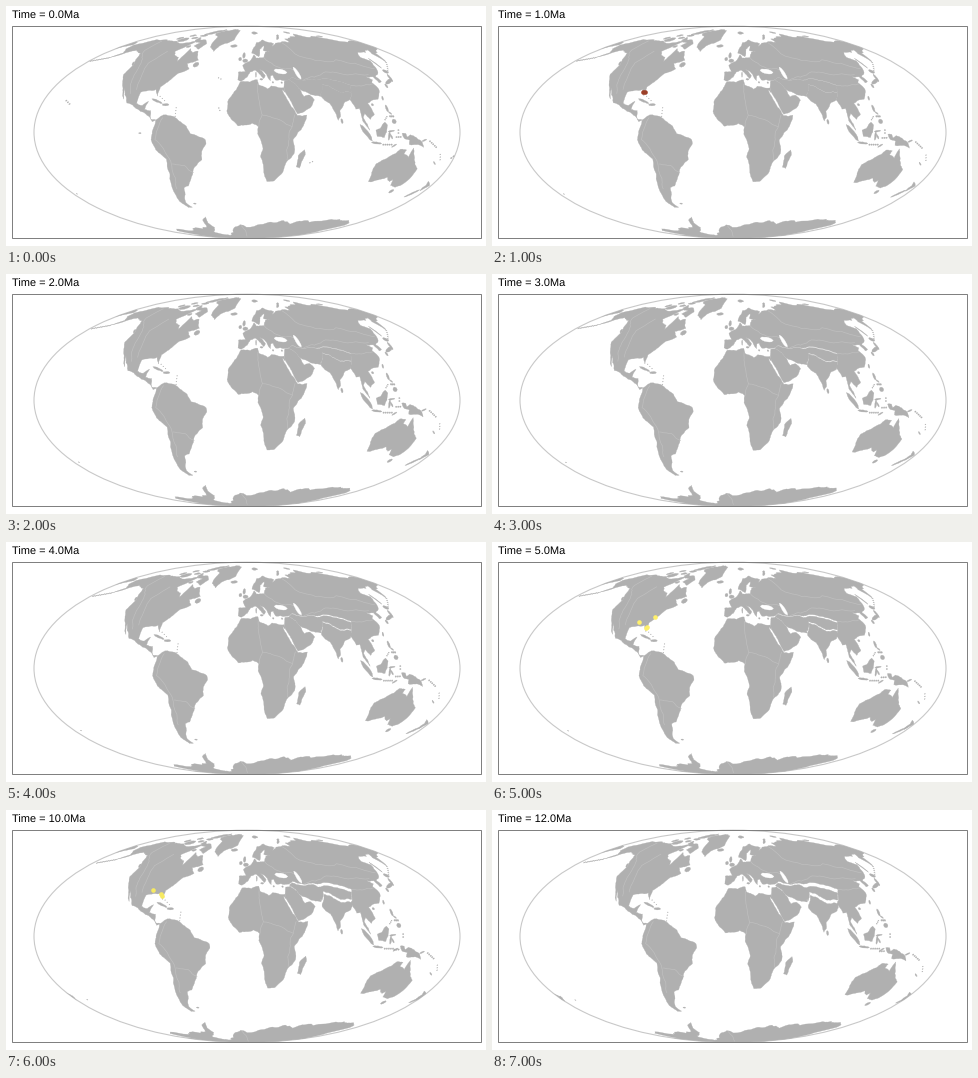
These frames come from a looping animation (480x240 px, 8000 ms). A matplotlib script:

```python
import numpy as np
import matplotlib.pyplot as plt
from matplotlib.animation import ArtistAnimation
from matplotlib.patches import Ellipse, Polygon, Rectangle

W, H, DPI = 480, 240, 100
PX = 72 / DPI
CX, CY, RX, RY = 241, 126.3, 213, 106.1
LAND, SEAM, RIM, BOX = "#b0b0b0", "#bfbfbf", "#c8c8c8", "#808080"
AGES = [0, 1, 2, 3, 4, 5, 10, 12]

# Rotation back in time: pole latitude, pole longitude, degrees per Myr
NAM = (62, 110, 0.40)
SAM = (90, 0, 0.33)
AFR = (28, 110, 0.22)
ARB = (15, 128, 0.21)
IRAN = (0, 128, 0.11)
IND = (-8, 168, 0.46)
TIBET = (-8, 168, 0.24)
EUR = (90, 0, 0.08)
SEA = (90, 0, 0.12)
PHL = (90, 0, 0.40)
AUS = (9, 40, -0.60)
PAC = (-80, 105, -0.85)
ANT = (0, 75, 0.17)

shapes = []


def roughen(points, rounds=3):
    """Break each edge at a shifted midpoint; an edge shared by two shapes breaks alike."""
    p = np.array(points, float)
    for _ in range(rounds):
        mid = (p[:-1] + p[1:]) / 2
        size = 0.07 * np.hypot(*(p[1:] - p[:-1]).T)
        mid[:, 0] += size * np.sin(7 * mid[:, 0] + 11 * mid[:, 1])
        mid[:, 1] += size * np.sin(13 * mid[:, 0] - 5 * mid[:, 1])
        out = np.empty((2 * len(p) - 1, 2))
        out[::2], out[1::2] = p, mid
        p = out
    return p


def land(plate, points, oldest=99):
    shapes.append((plate, roughen(points + points[:1]), "land", oldest))


def seam(plate, *points):
    shapes.append((plate, roughen(points), "seam", 99))


def blob(plate, lon, lat, length, width, tilt=0, kind="land", oldest=99):
    a, t = np.linspace(0, 2 * np.pi, 9), np.radians(tilt)
    u, v = length / 2 * np.cos(a), width / 2 * np.sin(a)
    points = np.column_stack([lon + u * np.cos(t) - v * np.sin(t),
                              lat + u * np.sin(t) + v * np.cos(t)])
    shapes.append((plate, roughen(points, 1), kind, oldest))


def chain(plate, start, end, count, size=1, oldest=99):
    for lon, lat in np.linspace(start, end, count):
        blob(plate, lon, lat, size, 0.8 * size, oldest=oldest)


def rotate(points, plate, age):
    """Turn points about the plate's pole; longitudes come back unbroken."""
    plat, plon, rate = np.radians(plate)
    lon, lat = np.radians(points).T
    r = np.array([np.cos(lat) * np.cos(lon), np.cos(lat) * np.sin(lon), np.sin(lat)]).T
    k = np.array([np.cos(plat) * np.cos(plon), np.cos(plat) * np.sin(plon), np.sin(plat)])
    a = rate * age
    r = (r * np.cos(a) + np.cross(k, r) * np.sin(a)
         + np.outer(r @ k, k) * (1 - np.cos(a)))
    lon = np.degrees(np.unwrap(np.arctan2(r[:, 1], r[:, 0])))
    lon -= 360 * np.round(lon.mean() / 360)
    return lon, np.degrees(np.arcsin(np.clip(r[:, 2], -1, 1)))


def mollweide(lon, lat):
    phi = np.radians(np.clip(lat, -89.9, 89.9))
    t = phi.copy()
    for _ in range(30):
        t -= (2 * t + np.sin(2 * t) - np.pi * np.sin(phi)) / (2 + 2 * np.cos(2 * t))
    return np.column_stack([CX + RX * lon / 180 * np.cos(t), CY - RY * np.sin(t)])


# North America
arctic = [(-168, 65.6), (-156.5, 71.3), (-128, 70), (-96, 68), (-82, 69.5), (-94, 60),
          (-82, 55), (-79.5, 51.3), (-77.5, 62.5), (-69.5, 59), (-64.5, 60.3), (-56, 52.5),
          (-66.5, 50), (-61, 45.5)]
gulf = [(-70, 42), (-76, 35.5), (-81, 31.8), (-80.5, 25.2), (-84, 30), (-97, 28),
        (-97, 20), (-91.5, 18.5), (-87, 21.5), (-88.7, 15.8), (-83.2, 15), (-82, 9),
        (-77.4, 8.5)]
pacific = [(-80.5, 7.3), (-87.5, 13), (-95, 16.1), (-105.6, 20.3), (-113.5, 31),
           (-109.6, 23), (-117.2, 32.8), (-124.3, 41), (-124, 48.5), (-135, 58.5),
           (-147, 61), (-163.5, 54.8), (-157.5, 58.7), (-165, 62)]
land(NAM, arctic + gulf + pacific)
land(NAM, [(-72, 78.2), (-60, 82), (-33, 83.5), (-20, 82), (-22, 71), (-40, 65),
           (-43.5, 60), (-52, 64), (-56, 74)])
land(NAM, [(-88, 73.5), (-71, 71), (-62, 67), (-66, 62), (-77, 65), (-73, 68), (-88, 70.5)])
blob(NAM, -110, 71, 15, 4)
blob(NAM, -122, 72.8, 8, 2.5)
blob(NAM, -78, 79.8, 30, 5, 10)
blob(NAM, -88, 75.6, 14, 1.8)
blob(NAM, -110, 75.6, 10, 2)
blob(NAM, -96, 73, 10, 2)
blob(NAM, -84, 64.5, 6, 2)
blob(NAM, -56, 48.8, 6, 4)
blob(NAM, -126, 49.6, 5, 1.5, -35)
blob(NAM, -79.5, 21.6, 11, 1.4, -17)
blob(NAM, -71.3, 19.1, 6, 1.6)
chain(NAM, (-61.5, 17), (-61.4, 11), 4, 0.7)
chain(NAM, (-78, 25), (-73, 22), 3, 0.7)
chain(NAM, (-164, 54.4), (-178, 51.8), 8, 1.4)
seam(NAM, (-141, 69.7), (-136, 61), (-118, 50), (-113, 40), (-106, 27))
seam(NAM, (-104, 60), (-110, 50), (-104, 37), (-102, 30))

# South America
land(SAM, [(-77.4, 8.5), (-71.7, 12), (-62, 10.6), (-51.5, 4.3), (-48, -1), (-35.3, -5.2),
           (-34.9, -8), (-39, -13.5), (-39.5, -19), (-48.5, -26), (-54.5, -34.8),
           (-57.5, -38), (-62, -39), (-66, -46), (-69, -51), (-65.2, -54.8), (-70, -55),
           (-75, -50), (-73.5, -37.2), (-70.4, -18.4), (-76.2, -14), (-81.3, -5),
           (-80, 0.8)])
blob(SAM, -59.5, -51.8, 3, 1)
seam(SAM, (-72, 10), (-78, -5), (-67, -20), (-67, -32), (-70, -40))
seam(SAM, (-66, -22), (-56, -23), (-49, -28))

# Africa and Arabia
land(AFR, [(-6, 35.8), (10, 37.2), (11, 33.5), (19, 30.3), (23, 32.6), (34.3, 31.3),
           (34.5, 28), (32.6, 29.9), (37.3, 20), (43.2, 11.5), (51.2, 11.9), (47.8, 4.5),
           (39, -5), (40.7, -14.5), (35.2, -20), (32.5, -28), (26, -34), (19, -34.6),
           (14.5, -22.5), (11.8, -17), (13.7, -11), (9, -1), (9.5, 4), (4.3, 6.3),
           (-7.5, 4.4), (-13.3, 9), (-17.4, 14.7), (-17, 21.3), (-9.7, 30)])
land(AFR, [(49.3, -12), (50.4, -15.5), (47, -25), (44, -24), (44.4, -16.2)])
seam(AFR, (10, 34), (10, 27), (13, 12), (10, 4))
seam(AFR, (13, 12), (22, 10), (38, 4))
seam(AFR, (41, 12), (36, 1), (34, -12), (35, -19))
land(ARB, [(34.5, 31.3), (36.3, 36.7), (41, 37.3), (46, 34), (49, 30), (51, 25),
           (56.3, 26), (59.8, 22.5), (55, 17), (43.5, 12.7), (39.2, 21), (34.8, 28.5)])

# Eurasia, with the blocks squeezed along its southern edge
himalaya = [(67, 27), (71, 34), (77, 32.5), (85, 28), (95, 28)]
kunlun = [(98, 33), (88, 36), (76, 38), (66, 37)]
zagros = [(41, 37.3), (46, 34), (49, 30), (56.5, 27), (66.5, 25)]
mediterranean = [(53, 37), (44, 39), (41, 37.3), (36.3, 36.7), (27.5, 37), (26, 40.7),
                 (23.5, 40), (22.7, 36.5), (19.5, 41.5), (13, 45.5), (18.3, 40),
                 (16, 38), (12.3, 41.7), (8.8, 44.4), (3.2, 43), (0, 39), (-5.6, 36.1)]
atlantic = [(-8.9, 37), (-8.9, 43), (-1.6, 43.5), (-4.6, 48.3), (4.5, 52.5), (8.5, 57),
            (11, 54.2), (20, 54.5), (23.6, 59.3), (29.5, 59.9), (21.5, 61), (25, 65.2),
            (17.3, 61.8), (14.2, 55.4), (6, 58.5), (15, 68.3), (27, 71), (41, 67),
            (36, 64.5), (54, 68.5)]
siberia = [(68, 68.5), (67, 72), (80, 73), (104, 77.6), (113, 74), (140, 72.6),
           (170, 70), (190, 66.2), (178, 62.5), (163, 58.5), (156.7, 51), (157, 58),
           (162, 61.6), (142.5, 59.3), (135.3, 54.8), (141, 52), (135.3, 44)]
orient = [(127.5, 39.5), (129.4, 36), (126.3, 34.8), (125, 39.5), (118, 39.5), (122, 37),
          (119.3, 35), (121.8, 30), (116.5, 23), (106, 20), (109.2, 12.5), (105, 8.9),
          (101, 13), (99.3, 10), (103.8, 1.4), (98.3, 8), (97.5, 16.5), (94.3, 16),
          (91.5, 22.7), (95, 28)]
land(EUR, mediterranean + atlantic + siberia + orient + kunlun)
land(TIBET, himalaya + kunlun)
land(IRAN, zagros + himalaya[:2] + [(66, 37), (53, 37), (44, 39)])
land(IND, himalaya + [(91.5, 22.7), (87, 21.3), (80.2, 15), (80, 11), (77.7, 8.2),
                      (72.8, 20), (69, 22), (66.5, 25)])
blob(IND, 80.7, 7.7, 3.4, 1.8, 100)
blob(EUR, 34.5, 43.5, 13, 3.6, -8, "sea")
blob(EUR, 51, 42.2, 10, 3.6, 110, "sea")
blob(EUR, -2, 52, 6, 3)
blob(EUR, -3.7, 56.5, 5, 3.2, 80)
blob(EUR, -8, 53.4, 3.5, 3)
blob(EUR, -19, 65, 10, 2.4)
blob(EUR, 18, 78.7, 14, 3)
blob(EUR, 59, 74, 16, 1.6, 20)
blob(EUR, 98, 79.3, 11, 2)
blob(EUR, 143, 74.8, 11, 1.2)
blob(EUR, 14, 37.5, 3, 1.3)
blob(EUR, 9, 41, 4, 1, 85)
chain(EUR, (24.8, 35.2), (33.2, 35), 2, 1.5)
blob(EUR, 131, 32.6, 3, 2, 80)
blob(EUR, 136.5, 35.8, 10, 2, 20)
blob(EUR, 140.8, 38.5, 6, 2, 75)
blob(EUR, 142.8, 43.4, 4.5, 3)
blob(EUR, 142.8, 50, 8, 1.2, 88)
chain(EUR, (146, 44), (156, 50.5), 5, 0.9)
blob(EUR, 121, 23.7, 3.2, 1.3, 70)
blob(EUR, 109.7, 19.1, 2, 1.6)
seam(EUR, (55, 68), (60, 58), (85, 52), (120, 50), (135, 46))
seam(EUR, (55, 37), (70, 40), (88, 43), (122, 41))
seam(EUR, (98, 33), (110, 33), (119, 34))
seam(EUR, (20, 55), (30, 48), (48, 45))

# South-east Asia
land(SEA, [(109, 1.5), (113, 3), (117, 7), (119, 5), (116.3, -3.5), (110.2, -2.8)])
blob(SEA, 101, -0.3, 15.5, 3, -47)
blob(SEA, 110, -7.3, 9, 1.4, -6)
blob(SEA, 122, 0.8, 5.5, 1, 8)
blob(SEA, 120.3, -2.5, 6, 1.5, 85)
blob(SEA, 122.2, -3, 4, 1.1, -55)
blob(SEA, 125.3, -9.2, 4.5, 1, 28)
chain(SEA, (116, -8.5), (123, -8.5), 5, 1.3)
blob(PHL, 121.3, 16.5, 5, 2, 95)
blob(PHL, 123, 13.3, 3, 0.9, -35)
blob(PHL, 125, 7.5, 3.6, 3.2)
chain(PHL, (122.3, 11), (125, 11), 3, 1.5)
chain(PHL, (117.5, 8.7), (119.5, 10.8), 3, 0.9)
chain(PHL, (128, 1.5), (128, -0.5), 2, 1.2)

# Australia and its neighbours
land(AUS, [(142.5, -10.8), (146.3, -19), (153.2, -25.5), (153, -30.5), (150, -37.5),
           (146.3, -39), (140, -37.5), (137.7, -33), (135.8, -34.8), (131.2, -31.5),
           (124, -33.5), (116, -34.8), (113.4, -25), (114.5, -21.7), (122, -18),
           (128, -14.8), (131.5, -11.6), (136.8, -12.2), (135.5, -15), (140.5, -17.5)])
blob(AUS, 146.6, -42, 3.6, 2.8)
land(AUS, [(131, -0.8), (134.2, -0.8), (135.5, -3.3), (138, -1.7), (147.8, -6),
           (150.8, -10.4), (143, -8.5), (138, -8.3), (138, -5.5), (133, -4)])
blob(AUS, 150.3, -5.5, 4, 1.1, 20)
blob(AUS, 165.5, -21.3, 3.8, 0.7, -35)
chain(AUS, (155.2, -6.2), (161.5, -10.3), 5, 1.2)
chain(AUS, (167, -15.3), (169, -19), 3, 0.8)
chain(AUS, (126.5, -3.3), (130, -3.2), 3, 1.3)
land(AUS, [(172.8, -34.5), (178.4, -37.7), (175.2, -41.6), (173.8, -39.2), (174.7, -37.5)])
blob(PAC, 170.6, -43.7, 8.5, 2.4, 42)
blob(PAC, -176.5, -44, 0.9, 0.6)

# Antarctica, later closed along the pole
shelf = [(-180, -84), (-158, -84), (-157, -77.5), (-146, -75.7), (-102, -74.5),
         (-75, -73.5), (-66, -66), (-58, -63.3), (-63.5, -69), (-62, -74), (-82, -80),
         (-62, -83), (-36, -80), (-30, -76.5), (-12, -71), (33, -69), (55, -66.8),
         (72, -70.5), (88, -66.8), (130, -66.2), (145, -67), (170.5, -71.5),
         (164, -77), (179.9, -84)]
shapes.append((ANT, roughen(shelf), "cap", 99))
seam(ANT, (-10, -72), (-3, -78), (0, -85))

# Young volcanic islands
chain(PAC, (-155.6, 19.6), (-160, 22), 3, 1.2, 0)
chain(PAC, (178, -17.8), (179.3, -16.6), 2, 1.4, 0)
chain(PAC, (-91, -0.6), (-90, -0.6), 2, 1, 0)
chain(AFR, (-28, 38.6), (-25.5, 37.7), 2, 0.9, 0)
chain(AFR, (-24.5, 16.8), (-23.5, 15.1), 2, 0.9, 0)
chain(AFR, (55.5, -21.1), (57.6, -20.3), 2, 0.9, 0)

# Sites by age: colour, then positions on the stage
SITES = {
    1: ("#9c3f28", [(151, 86), (153, 86)]),
    5: ("#fff06a", [(147, 80), (153.6, 86), (155, 84.6), (163.3, 75.2)]),
    10: ("#f7ea62", [(147, 79.8), (155, 83.8), (155.6, 86)]),
}

plt.rcParams["text.hinting"] = "none"
fig = plt.figure(figsize=(W / DPI, H / DPI), dpi=DPI, facecolor="white")
ax = fig.add_axes([0, 0, 1, 1])
ax.set(xlim=(0, W), ylim=(H, 0))
ax.axis("off")
globe = ax.add_patch(Ellipse((CX, CY), 2 * RX, 2 * RY, fill=False, ec=RIM,
                             lw=1.1 * PX, zorder=1))
ax.add_patch(Rectangle((6.1, 20.1), 469, 212, fill=False, ec=BOX, lw=PX, zorder=5))


def outline(plate, points, kind, age):
    lon, lat = rotate(points, plate, age)
    if kind == "cap":
        down = np.linspace(0, 1, 8)
        lon = np.r_[lon, np.full(8, lon[-1]), np.full(8, lon[0])]
        lat = np.r_[lat, lat[-1] + (-90 - lat[-1]) * down, -90 + (lat[0] + 90) * down]
    turns = [0]
    if lon.max() > 180:
        turns.append(-360)
    if lon.min() < -180:
        turns.append(360)
    return [mollweide(lon + turn, lat) for turn in turns]


def draw(age):
    artists = [ax.text(6.3, 12.9, f"Time = {age:.1f}Ma", family="Liberation Sans",
                       size=11 * PX, color="black")]
    for plate, points, kind, oldest in shapes:
        if age > oldest:
            continue
        for xy in outline(plate, points, kind, age):
            if kind == "seam":
                part, = ax.plot(*xy.T, color=SEAM, lw=0.7 * PX, zorder=3)
            else:
                color = "white" if kind == "sea" else LAND
                part = ax.add_patch(Polygon(xy, fc=color, ec=color, lw=0.3 * PX, zorder=2))
            part.set_clip_path(globe)
            artists.append(part)
    if age in SITES:
        color, spots = SITES[age]
        artists.append(ax.scatter(*zip(*spots), s=(4.6 * PX) ** 2, c=color, lw=0, zorder=4))
    return artists


anim = ArtistAnimation(fig, [draw(age) for age in AGES], interval=1000,
                       repeat=True, repeat_delay=0)
plt.show()
```
